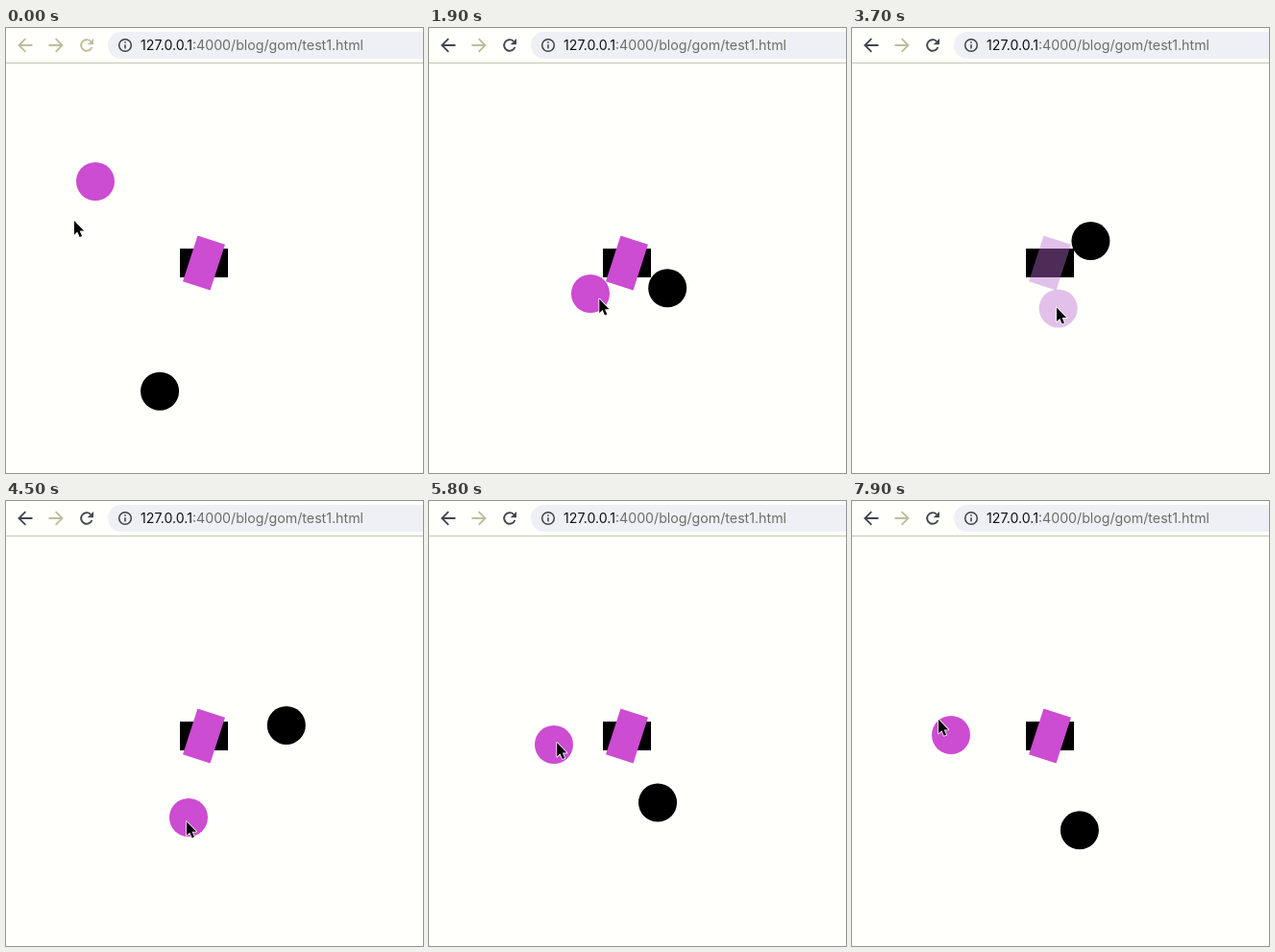
Write an HTML page that moves like this. It is 434x464 px and loops after 8 s.

```html
<!DOCTYPE html>
<html lang="en">
<head>
<meta charset="utf-8">
<title>Rotated drag test</title>
<style>
  html, body { margin: 0; width: 100%; height: 100%; overflow: hidden; background: #fffffb; }
  svg { display: block; width: 434px; height: 464px; }
  .url { font: 14.2px Inter, Roboto, sans-serif; fill: #6a6e67; }
  .url .host { fill: #111; }
  .icon { fill: none; stroke: #bdbd9c; stroke-width: 1.9; }
  .focused .nav { stroke: #42464f; }
  .nav .tip { fill: #bdbd9c; stroke: none; }
  .focused .nav .tip { fill: #42464f; }
  #pair { fill: #cc4cd2; }
  #pair.hit { fill: #b86cd0; fill-opacity: .42; }
</style>
</head>
<body>
<svg id="stage" viewBox="0 0 434 464">
  <defs>
    <rect id="box" x="-25" y="-15" width="50" height="30"/>
    <circle id="ball" r="20"/>
  </defs>

  <rect x="106" y="4" width="360" height="28" rx="14" fill="#eff0f6"/>
  <path d="M0 36.5H434" stroke="#c6c6b0"/>
  <path class="icon nav" d="M27.5 18H14M20.3 11.2L13.5 18L20.3 24.8"/>
  <path class="icon" d="M44.5 18H58M51.7 11.2L58.5 18L51.7 24.8"/>
  <g class="icon nav">
    <path d="M89.4 20A5.8 5.8 0 1 1 88.1 13.9"/>
    <path class="tip" d="M91 11V17.3H84.7Z"/>
  </g>
  <g fill="none" stroke="#3c4043" stroke-width="1.5">
    <circle cx="124" cy="18" r="6.3"/>
    <path d="M124 17.2V21.6M124 14.2V15.8"/>
  </g>
  <text class="url" x="140" y="23"><tspan class="host">127.0.0.1</tspan>:4000/blog/gom/test1.html</text>

  <use href="#box" transform="translate(206 245)"/>
  <use href="#ball" id="black"/>
  <g id="pair">
    <use href="#box" transform="translate(206 245) rotate(108)"/>
    <use href="#ball" id="pink"/>
  </g>
  <path id="cursor" d="M0 0V14.6L3.3 11.5L5.7 17L8 16L5.7 10.6H10.2Z"
        stroke="#fff" stroke-width="1.6" paint-order="stroke" stroke-linejoin="round"/>
</svg>
<script>
  const CENTER = [206, 245];
  const TURN = -108 * Math.PI / 180;
  const STEP = 100, STEPS = 80;
  const FOCUS_STEP = 7;
  const REST = [71, 201];   // pointer before it reaches the ball
  const LEAD = 0.4;         // steps by which the pointer runs ahead of the ball

  // [step, x, y]: turns of the dragged ball's path, relative to CENTER
  const drag = [
    [9, -113, -85], [11, -124, -92], [15, -105, -15], [19, -38, 32], [23, 72, 88],
    [29, 132, 102], [31, 130, 95], [36, 14, 50], [41, -4, 42], [45, -16, 85],
    [49, -50, 121], [54, -92, 45], [58, -76, 9], [60, -57, 2], [72, -33, -2],
    [77, -60, 21], [79, -103, -1], [80, -130, -40]
  ];

  const clamp = u => Math.min(1, Math.max(0, u));
  const smooth = u => u * u * (3 - 2 * u);
  const add = (p, q) => [p[0] + q[0], p[1] + q[1]];
  const mix = (p, q, u) => p.map((v, k) => v + (q[k] - v) * u);
  const slope = (a, b, k) => a && b ? (b[k] - a[k]) / (b[0] - a[0]) : 0;

  // Tangents vanish at turning points, so the curve never overshoots a key.
  function tangent(i, k) {
    const before = slope(drag[i - 1], drag[i], k);
    const after = slope(drag[i], drag[i + 1], k);
    return before * after > 0 ? 2 * before * after / (before + after) : 0;
  }

  function ballAt(t) {
    let i = 0;
    while (i < drag.length - 2 && t >= drag[i + 1][0]) i++;
    const a = drag[i], b = drag[i + 1], span = b[0] - a[0];
    const u = clamp((t - a[0]) / span), v = 1 - u;
    return [1, 2].map(k =>
      smooth(v) * a[k] + smooth(u) * b[k] +
      span * u * v * (v * tangent(i, k) - u * tangent(i + 1, k)));
  }

  function rotate([x, y], angle) {
    const c = Math.cos(angle), s = Math.sin(angle);
    return [x * c - y * s, x * s + y * c];
  }

  const get = id => document.getElementById(id);
  const stage = get('stage'), pair = get('pair'), cursor = get('cursor');
  const pink = get('pink'), black = get('black');

  const place = (el, [x, y]) =>
    el.setAttribute('transform', `translate(${x.toFixed(2)} ${y.toFixed(2)})`);

  function draw(step) {
    const rel = ballAt(step);
    const local = rotate(rel, TURN);
    const gap = Math.hypot(
      Math.max(0, Math.abs(local[0]) - 25),
      Math.max(0, Math.abs(local[1]) - 15));
    const hand = add(CENTER, ballAt(step + LEAD));

    place(pink, add(CENTER, rel));
    place(black, add(CENTER, local));
    place(cursor, mix(REST, hand, smooth(clamp((step - 2) / 6))));
    pair.classList.toggle('hit', gap < 20);
    stage.classList.toggle('focused', step >= FOCUS_STEP);
  }

  const start = performance.now();
  function tick() {
    draw(Math.floor((performance.now() - start) / STEP) % STEPS);
    requestAnimationFrame(tick);
  }
  tick();
</script>
</body>
</html>
```
